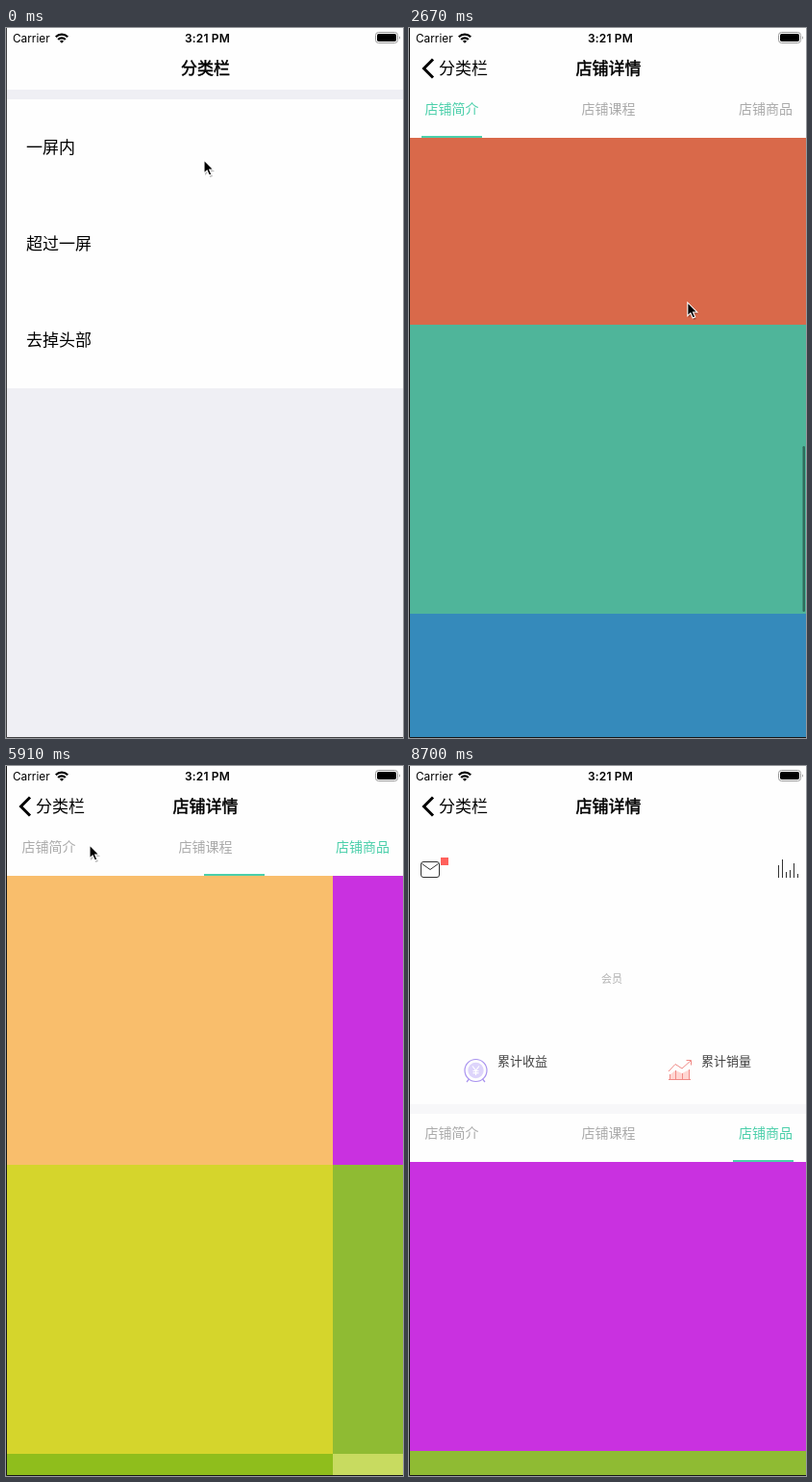
Write an HTML page that moves like this. It is 413x737 px and loops after 9280 ms.

```html
<!DOCTYPE html>
<html lang="zh">
<head>
<meta charset="utf-8">
<title>分类栏</title>
<style>
  html, body { margin: 0; width: 100%; height: 100%; overflow: hidden; background: #fefefe; }
  svg { display: block; width: 100%; height: 100%; }
  text { font-family: "Noto Sans CJK SC", "Noto Sans CJK", sans-serif; font-size: 17px; }
  .latin { font-family: Inter, Roboto, sans-serif; font-size: 12px; }
  .mid { text-anchor: middle; }
  .strong { stroke: #000; stroke-width: .5; }
  .tab { font-size: 14px; }
  .label { font-size: 13px; fill: #444; }
  .line { fill: none; }
  .paper { fill: #fefefe; }
</style>
</head>
<body>
<svg viewBox="0 0 413 737" preserveAspectRatio="none">
  <g id="menu">
    <rect width="413" height="737" fill="#efeff4"/>
    <rect class="paper" y="74" width="413" height="300"/>
    <text x="21" y="130">一屏内</text>
    <text x="21" y="230">超过一屏</text>
    <text x="21" y="330">去掉头部</text>
  </g>

  <g id="detail">
    <rect y="64" width="413" height="673" fill="#f7f7f9"/>
    <g id="pages"></g>
    <rect id="scrollbar" x="409.5" width="2.5" height="172" rx="1.2" opacity=".4"/>
    <g id="header">
      <rect class="paper" y="-40" width="413" height="391"/>
      <g class="line" stroke="#333">
        <rect x="12.5" y="99.5" width="19" height="16" rx="2.5"/>
        <path d="M13.5 101.5L22 107.5L30.5 101.5"/>
        <path d="M384.5 103V116M388.5 97V116M392.5 110V116M396.5 108V116M400.5 101V116M404.5 112V116"/>
      </g>
      <rect x="33" y="95" width="8" height="8" fill="#ff615c"/>
      <text class="mid" x="211" y="225" style="font-size:11px" fill="#b4b4b4">会员</text>
      <g class="line" stroke="#a892ef" stroke-width="1.2">
        <circle cx="69.5" cy="316" r="11.5"/>
        <circle cx="69.5" cy="316" r="8.2" fill="#ddd4fb" stroke="none"/>
        <path d="M62.5 325L60 328M76.5 325L79 328"/>
        <path d="M66 311.5L69.5 316L73 311.5M69.5 316V321M66.5 316.5H72.5M66.5 318.7H72.5" stroke="#fff"/>
      </g>
      <path d="M271 321L277 316L284 319L292 315V325H271Z" fill="#ffd6d2"/>
      <path class="line" stroke="#f08a86"
        d="M270 317L277 309.5L284 314L293 306M288.5 305.5H293.5V310.5M271.5 320V325M277.5 316V325M284.5 319V325M291.5 315V325M270 325.5H293"/>
      <text class="label" x="92" y="310.7">累计收益</text>
      <text class="label" x="304" y="310.7">累计销量</text>
      <rect y="351" width="413" height="10" fill="#f7f7f9"/>
      <rect class="paper" y="361" width="413" height="50"/>
      <text class="tab" x="16.5" y="386.3">店铺简介</text>
      <text class="tab" x="179.5" y="386.3">店铺课程</text>
      <text class="tab" x="343" y="386.3">店铺商品</text>
      <rect id="marker" y="409" width="63" height="2" fill="#4bcfaa"/>
    </g>
  </g>

  <rect class="paper" width="413" height="64"/>
  <path id="chevron" class="line" d="M25 32.5L15.5 42L25 51.5" stroke="#000" stroke-width="3"/>
  <text id="menuTitle" class="mid" y="48.2">分类栏</text>
  <text id="detailTitle" class="mid strong" y="48.2">店铺详情</text>

  <text class="latin" x="7" y="15" style="font-size:11.8px">Carrier</text>
  <g class="line" stroke="#000" stroke-width="2.2">
    <path d="M51.8 9.3A8.7 8.7 0 0 1 64.2 9.3M54.2 11.9A5.3 5.3 0 0 1 61.8 11.9"/>
    <path d="M58 15.8L55.9 13.7A3 3 0 0 1 60.1 13.7Z" fill="#000" stroke="none"/>
  </g>
  <text class="latin mid" x="209.5" y="15" font-weight="600" letter-spacing=".15">3:21 PM</text>
  <rect x="384.5" y="4.5" width="23" height="11" rx="3" fill="none" stroke="#999"/>
  <rect x="386" y="6" width="20" height="8" rx="1.8"/>
  <path d="M409 8.2Q411 10 409 11.8Z" fill="#999"/>

  <path id="frame" class="line" d="M.5 0V736.5H413"/>
  <g id="cursor">
    <path d="M1 2V16L4 13L6.3 18L9 17L6.8 12H11Z" opacity=".25"/>
    <path d="M0 0V13.8L3.1 10.9L5.4 16L7.9 14.9L5.7 10H9.9Z" stroke="#fff" stroke-width="1.1"/>
  </g>
</svg>

<script>
const LOOP = 9280, STEP = 147.2, LEAD = 8;
const WIDTH = 412, HEADER = 297, ROW = 300;
const $ = id => document.getElementById(id);
const tabs = [...document.querySelectorAll('.tab')];

const columns = [
  ['#8a5bd0', '#e4bf70', '#12380e', '#2d62bc', '#d9694a', '#4fb59a', '#358abb', '#f533d9'],
  ['#f9be6c', '#d5d52c', '#8fbe1c'],
  ['#c931e0', '#8fbb33', '#c8db60']
];

// All motion below is timed in steps, the interval at which the picture is refreshed.
const ramp = (n, from, to) => Math.min(1, Math.max(0, (n - from) / (to - from)));
const ease = (n, from, to) => { const x = ramp(n, from, to); return x * x * (3 - 2 * x); };
const swing = (n, from, to, times = 1) => Math.abs(Math.sin(Math.PI * times * ramp(n, from, to)));

// Page turns: from, to, pages moved. A tab lights up once its page has settled.
const turns = [[28, 31, 1], [31.15, 34, 1], [38, 40.73, -1], [42, 45, -1], [47, 50, 2]];

// Resting points of the pointer: step, x, y.
const stops = [
  [0, 206, 137], [3, 190, 135], [4, 190, 135], [8, 288, 470], [11, 293, 212], [22, 288, 247], [27, 285, 380],
  [30, 130, 295], [31, 279, 290], [32, 191, 288], [36, 217, 80], [37, 200, 86], [38, 200, 86],
  [40, 87, 82], [47, 370, 86], [53, 240, 378], [56, 238, 780]
];

function pointer(n) {
  const i = Math.max(1, stops.findIndex(stop => stop[0] >= n));
  const [from, x0, y0] = stops[i - 1], [to, x1, y1] = stops[i];
  const k = ramp(n, from, to);
  const flicks = 180 * swing(n, 11, 22, 3);
  return [x0 + (x1 - x0) * k, y0 + (y1 - y0) * k + flicks];
}

const move = (node, x, y) => node.setAttribute('transform', `translate(${x} ${y})`);

function add(name, parent, attributes = {}) {
  const node = document.createElementNS('http://www.w3.org/2000/svg', name);
  for (const key in attributes) node.setAttribute(key, attributes[key]);
  return parent.appendChild(node);
}

const pages = columns.map(colors => {
  const group = add('g', $('pages'));
  colors.forEach((fill, i) => add('rect', group, { y: i * ROW, width: WIDTH, height: ROW, fill }));
  return group;
});

function draw(n) {
  const push = ease(n, 4, 7);
  const head = Math.round(HEADER * (ease(n, 8, 10) - ease(n, 53, 55)) - 42 * swing(n, 54.5, 59));
  const list = Math.round(1865 * ramp(n, 8.66, 22) - 88 * ease(n, 22, 24) - 320 * ease(n, 25, 28));
  const page = turns.reduce((sum, [from, to, by]) => sum + by * ease(n, from, to), 0);
  const selected = turns.reduce((sum, [, to, by]) => sum + (n >= to ? by : 0), 0);

  move($('menu'), -124 * push, 0);
  move($('detail'), 413 * (1 - push), 0);
  move($('header'), 0, -head);
  pages.forEach((group, i) => move(group, 1 + Math.round(WIDTH * (i - page)), 411 - head - (i ? 0 : list)));

  $('marker').setAttribute('x', Math.round(13 + 165 * ramp(page, 0, 1) + 159 * ramp(page, 1, 2)));
  tabs.forEach((tab, i) => tab.setAttribute('fill', i === selected ? '#4bcfaa' : '#aaa'));

  $('scrollbar').setAttribute('y', HEADER - head + 114 + list * .245);
  $('scrollbar').style.display = n > 8 && n < 21 ? '' : 'none';

  $('menuTitle').setAttribute('x', 207.5 - 151 * push);
  $('menuTitle').classList.toggle('strong', push === 0);
  $('detailTitle').setAttribute('x', 207.5 + 190 * (1 - push));
  $('detailTitle').setAttribute('opacity', push);
  $('chevron').setAttribute('opacity', push);
  $('frame').setAttribute('stroke', push ? '#161616' : '#3f3f41');
  move($('cursor'), ...pointer(Math.min(n, 56)));
}

const start = performance.now();
let shown = -1;
function tick() {
  const t = (performance.now() - start) % LOOP;
  const n = Math.max(0, Math.floor((t - LEAD) / STEP));
  // The pointer rests until its first move.
  const step = n < 3 ? 0 : n;
  if (step !== shown) draw(shown = step);
  requestAnimationFrame(tick);
}
tick();
</script>
</body>
</html>
```
